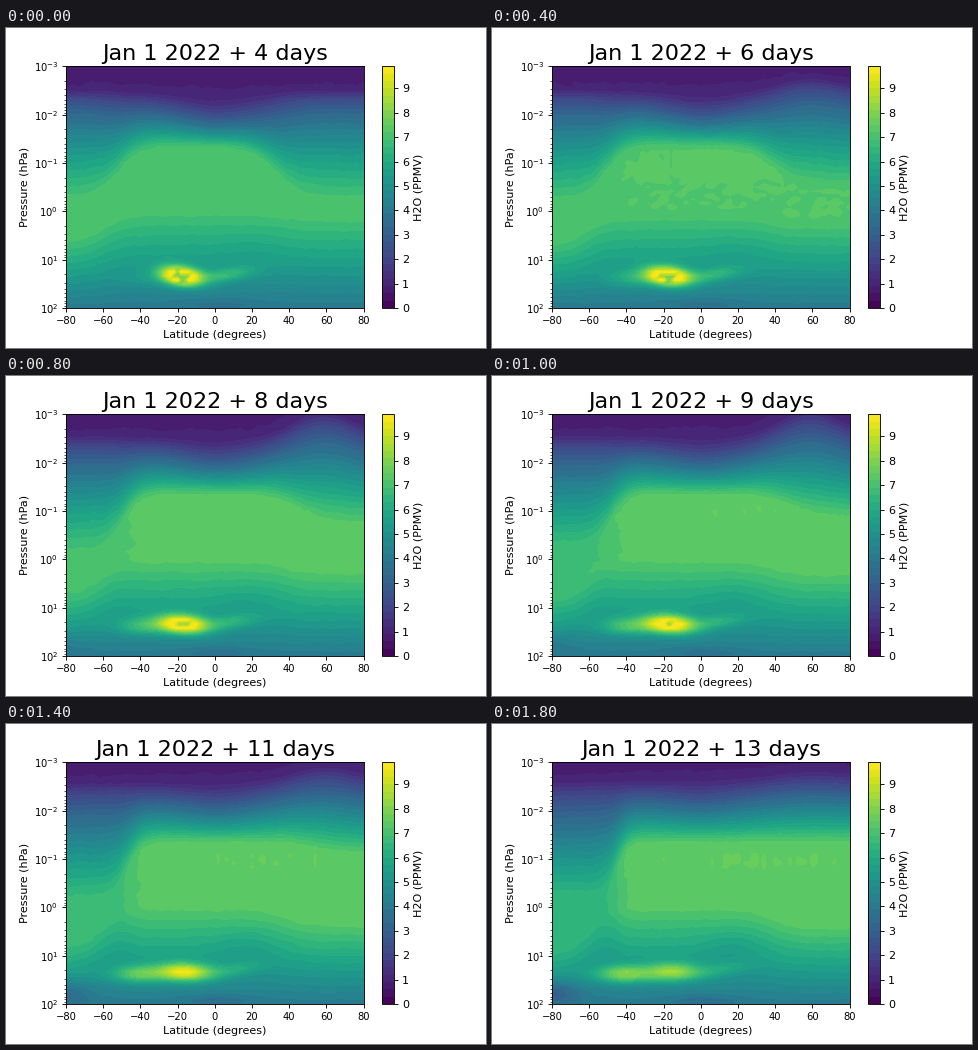
Recreate the animation shown at these times as a matplotlib script. Size 480 by 320 pixels, loop 2 s.

```python
import numpy as np
import matplotlib.pyplot as plt
from matplotlib.animation import FuncAnimation

FRAMES = 10
LEVELS = np.arange(0, 10, 0.3)
BOTTOM = 4.0  # mixing ratio at the lowest level

LAT = np.linspace(-80, 80, 81)
Z = np.linspace(-3, 2, 61)  # log10 of pressure
X, Y = np.meshgrid(LAT, Z)


def bell(d, width):
    return np.exp(-0.5 * (d / width) ** 2)


def step(d, width):
    """Soft step from 0 to 1 around d = 0."""
    return 1 / (1 + np.exp(-d / width))


def mix(a, b, t):
    return a + (b - a) * t


def ease(t):
    t = np.clip(t, 0, 1)
    return t * t * (3 - 2 * t)


def blur(a, axis):
    """Three-point smoothing along one axis, edges held."""
    def smooth(row):
        return np.convolve(np.pad(row, 1, mode="edge"), [0.25, 0.5, 0.25], "valid")

    return np.apply_along_axis(smooth, axis, a)


def background(t):
    south = step(mix(-52, -45, t) - X, mix(6, 3, t))
    north = step(X - mix(33, 58, t), 7)

    # moist layer: its value, its top and bottom edges
    moist = mix(7.03, 7.31, ease(2.5 * t)) - 0.85 * t * south
    top = -1.36 + 1.12 * south + 1.12 * (1 - t) * north
    base = (mix(0.6, 0.95, t) * step(-60 - X, 6)
            + mix(0.13, 0.4, t) * step(X - 38, 6))

    # height where the dry upper air starts to moisten
    dome = np.sin(np.pi * t) ** 2 + 0.2 * t
    dry = -2.47 + 0.08 * (1 - t) * bell(X, 18) - t * (0.2 + 0.0012 * X)
    dry = dry - 0.42 * dome * bell(X - 58, 15)

    power = 1 + mix(0.6, 0.25, t) * bell(X - 2, 16)
    power = power - mix(0.4, 0.25, t) * south - 0.4 * (1 - t) * north

    rise = np.clip((Y - dry) / (top - dry), 0, 1) ** power
    fall = np.clip((Y - base) / (2 - base), 0, 1)
    v = 1.0 + (moist - 1.0) * rise + (BOTTOM - moist) * fall
    return v + 0.65 * np.minimum(Y - dry, 0)


def pockets(t):
    wet = mix(0.09, 0.2, t) * bell(X - mix(2, 30, t), mix(22, 50, t))
    wet = wet * bell(Y + 0.97, 0.22)
    dry = mix(0.1, 0.4, t) * bell(X - 17, 12) * bell(Y - 0.8, 0.25)
    dry += mix(0.4, 0.5, t) * bell(X - 2, 13) * bell(Y - 1.9, 0.08)
    dry += 1.6 * t ** 2 * bell(X + 80, 10) * bell(Y - 1.75, 0.17)
    return wet - dry


def plume(t):
    core = mix(7, 3.3, t ** 1.6) * bell(X + mix(18, 15.5, t), mix(7.5, 10.5, t))
    core *= bell(Y - 1.34 - 0.005 * (1 - t) * (X + 18), 0.125)
    lobe = mix(0.5, 3.1, t ** 0.8) * bell(X + mix(34, 42, t), 10.5)
    lobe *= bell(Y - 1.38, 0.12)
    tail = mix(1.7, 0.9, t) * bell(X - mix(5, 10, t), 11)
    tail *= bell(Y - 1.35 + 0.006 * np.maximum(X, 0), 0.09)
    return core + lobe + tail


def texture(k):
    rng = np.random.default_rng(40 + k)
    grain = blur(rng.normal(0, 0.03, X.shape), 1)
    return grain + rng.normal(0, 0.035, LAT.size) * bell(Y + 1, 0.17)


def field(k):
    t = k / (FRAMES - 1)
    v = blur(background(t), 0) + pockets(t) + texture(k) + plume(t)
    # readings above the scale drop out in the plume's heart
    return np.where(v > 10.8, 8.1, np.clip(v, 0.05, 9.75))


fig, ax = plt.subplots(figsize=(6, 4), dpi=80)
fig.subplots_adjust(left=0.125, right=0.9, bottom=0.125, top=0.88)
ax.set_yscale("log")


def draw_field(k):
    return ax.contourf(LAT, 10 ** Z, field(k), levels=LEVELS, cmap="viridis")


shown = draw_field(0)
bar = fig.colorbar(shown, ax=ax, ticks=range(10))
bar.set_label("H2O (PPMV)")

ax.set_xlim(-80, 80)
ax.set_ylim(1e2, 1e-3)
ax.set_xticks(range(-80, 81, 20))
ax.tick_params(labelsize=9)
ax.set_xlabel("Latitude (degrees)")
ax.set_ylabel("Pressure (hPa)")
title = ax.set_title("", fontsize=20)


def update(k):
    global shown
    shown.remove()
    shown = draw_field(k)
    title.set_text(f"Jan 1 2022 + {k + 4} days")
    return shown, title


anim = FuncAnimation(fig, update, frames=FRAMES, interval=200, repeat=True,
                     repeat_delay=0, blit=False)
plt.show()
```
